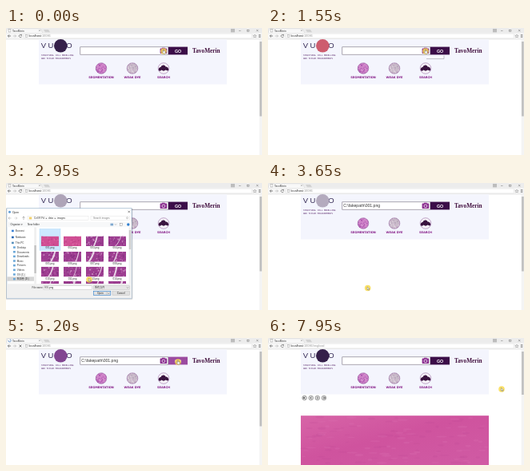
An HTML page that plays this animation: 320 px wide and 159 px high, repeating every 8000 ms.

```html
<!DOCTYPE html>
<html lang="en">
<head>
<meta charset="utf-8">
<title>TavoMerin</title>
<style>
html, body { margin: 0; width: 100%; height: 100%; overflow: hidden; background: #fff; }
svg { display: block; width: 100%; height: 100%; }
text { font-family: "Liberation Sans", "Noto Sans CJK SC", "Noto Sans CJK", sans-serif; white-space: pre; }
.label { font: bold 3.6px "DejaVu Sans", sans-serif; fill: #861d88; text-anchor: middle; }
.mono { font: 2.69px "DejaVu Sans Mono", monospace; fill: #5b2a6c; }
.word { font: bold 7.3px "Liberation Serif", serif; fill: #42103f; }
.mark { font-size: 9.5px; fill: #352a55; text-anchor: middle; }
</style>
</head>
<body>
<svg id="stage" viewBox="0 0 320 159" preserveAspectRatio="none"></svg>
<script>
const NS = 'http://www.w3.org/2000/svg';
const LOOP = 8000;
const stage = document.getElementById('stage');

function add(parent, tag, attrs = {}, content) {
  const el = document.createElementNS(NS, tag);
  for (const k in attrs) el.setAttribute(k, attrs[k]);
  if (content !== undefined) el.textContent = content;
  parent.appendChild(el);
  return el;
}
const group = (p, attrs) => add(p, 'g', attrs);
const rect = (p, x, y, width, height, fill, more) => add(p, 'rect', { x, y, width, height, fill, ...more });
const circle = (p, cx, cy, r, fill, more) => add(p, 'circle', { cx, cy, r, fill, ...more });
const line = (p, d, stroke, w = 0.6, more) => add(p, 'path', { d, stroke, 'stroke-width': w, fill: 'none', ...more });
const text = (p, x, y, s, size = 3, fill = '#444', more) => add(p, 'text', { x, y, 'font-size': size, fill, ...more }, s);
const styled = (p, x, y, s, cls) => add(p, 'text', { x, y, class: cls }, s);
const show = (el, on) => el.setAttribute('display', on ? 'inline' : 'none');
const move = (el, x, y) => el.setAttribute('transform', `translate(${x.toFixed(2)} ${y.toFixed(2)})`);
const border = (stroke, w = 0.5) => ({ stroke, 'stroke-width': w });

function random(seed) {
  return () => (seed = (seed * 16807) % 2147483647) / 2147483647;
}

// Clips shared by the thumbnails and round icons
const defs = add(stage, 'defs');
function clip(id, tag, attrs) {
  add(add(defs, 'clipPath', { id }), tag, attrs);
}
clip('thumb', 'rect', { width: 22, height: 12.5 });
clip('thumbCut', 'rect', { width: 22, height: 3.5 });
clip('disc', 'circle', { r: 7 });
const tissue = add(defs, 'linearGradient', { id: 'tissue', x1: 0, y1: 0, x2: 1, y2: 1 });
[['0', '#d764a7'], ['.45', '#cf539e'], ['1', '#d05ba4']].forEach(([offset, c]) =>
  add(tissue, 'stop', { offset, 'stop-color': c }));

// Browser window
rect(stage, 0, 0, 320, 159, '#fff');
rect(stage, 0, 0, 320, 7, '#ececec');
add(stage, 'path', { d: 'M0 6.5L2 .8H43L46 6.5Z', fill: '#f8f8f8', stroke: '#c4c4c4', 'stroke-width': 0.4 });
add(stage, 'path', { d: 'M47 2H53L55 5.3H49Z', fill: '#d2d2d2' });
rect(stage, 0, 6.3, 320, 7.6, '#f6f6f6');
line(stage, 'M0 14H320', '#d2d2d2', 0.5);
const tabPage = rect(stage, 3.3, 1.6, 2.6, 3.4, '#fff', border('#888', 0.4));
const tabSpin = line(stage, 'M1.6 0A1.6 1.6 0 1 1 0 -1.6', '#4a7fc0', 0.7);
text(stage, 8, 4.7, 'TavoMerin', 3.2, '#333');
line(stage, 'M41 2.2l2 2m0-2l-2 2', '#777', 0.4);
rect(stage, 281, 1, 5, 4.4, '#bcbcbc');
line(stage, 'M291 3.5h2.6', '#555', 0.4);
rect(stage, 301.5, 2.2, 2.4, 2.4, 'none', border('#555', 0.4));
line(stage, 'M313 2l2.4 2.4m0-2.4l-2.4 2.4', '#555', 0.4);
line(stage, 'M6 10H2.4M4 8.4L2.4 10L4 11.6', '#555', 0.7);
line(stage, 'M9 10h3.6M11 8.4L12.6 10L11 11.6', '#bbb', 0.7);
const reload = line(stage, 'M19.6 10.6A1.7 1.7 0 1 1 19.2 8.8M19.6 7.8V9.2H18.2', '#555', 0.6);
const stop = line(stage, 'M16.6 8.6l2.8 2.8m0-2.8l-2.8 2.8', '#555', 0.7);
rect(stage, 22.5, 7.2, 285, 5.6, '#fff', { rx: 0.6, ...border('#d4d4d4', 0.4) });
rect(stage, 24.3, 8.2, 2.5, 3.4, '#fff', border('#888', 0.4));
const url = add(stage, 'text', { x: 28.5, y: 11.4, 'font-size': 3.9, fill: '#222' });
add(url, 'tspan', {}, 'localhost');
const urlPath = add(url, 'tspan', { fill: '#999' });
add(stage, 'path', { d: 'M311 8l.6 1.4 1.5.1-1.2 1 .4 1.5-1.3-.8-1.3.8.4-1.5-1.2-1 1.5-.1z', fill: 'none', stroke: '#777', 'stroke-width': 0.4 });
line(stage, 'M315.8 8.6h2.6m-2.6 1.4h2.6m-2.6 1.4h2.6', '#555', 0.6);
rect(stage, 316.6, 14.2, 3.4, 145, '#f4f4f4');
const scrollThumb = rect(stage, 317, 17, 2.8, 93.5, '#c1c1c1');

// Page header
rect(stage, 41, 14.2, 235, 56.3, '#f4f5fd');
styled(stage, 46.8, 25.4, 'V', 'mark');
styled(stage, 56, 25.4, 'U', 'mark');
styled(stage, 79, 25.4, 'O', 'mark');
const logo = circle(stage, 68.3, 22.3, 8.3, '#35204a');
styled(stage, 44, 35.3, 'STRUCTURAL CELL MODELLING', 'mono');
styled(stage, 44, 38.8, 'AND TISSUE MEASUREMENTS', 'mono');
rect(stage, 92.8, 23.8, 110, 9.4, '#fff', border('#77707c', 0.6));
const query = text(stage, 94.2, 30.2, 'C:\\fakepath\\001.png', 5.1, '#333');
rect(stage, 192.6, 25.6, 8.6, 6.4, '#8b2f90', { rx: 0.8 });
rect(stage, 195, 24.7, 3.6, 1.6, '#8b2f90');
circle(stage, 196.9, 28.9, 1.9, '#8b2f90', border('#fff', 0.7));
const go = rect(stage, 203, 23.6, 24, 9.8, '#3b0d48');
text(stage, 215, 30.5, 'GO', 5.3, '#fff', { 'text-anchor': 'middle', 'font-weight': 'bold' });
styled(stage, 233, 31, 'TavoMerin', 'word');

// Round menu icons
function menuIcon(x, name, base, spots, seed) {
  const g = group(stage, { transform: `translate(${x} 50.5)` });
  const inner = group(g, { 'clip-path': 'url(#disc)' });
  circle(inner, 0, 0, 7, base);
  const rnd = random(seed);
  for (let i = 0; i < 60 && spots; i++)
    circle(inner, rnd() * 14 - 7, rnd() * 14 - 7, 0.4 + rnd() * 0.5, spots[i % spots.length], { opacity: 0.7 });
  circle(g, 0, 0, 6.8, 'none', border('#8d5a98', 0.5));
  styled(stage, x, 63, name, 'label');
  return inner;
}
menuIcon(119, 'SEGMENTATION', '#cf83c8', ['#a646a8', '#e3b0e0', '#8f3a9c'], 71);
menuIcon(158, 'WEAK DYE', '#cbbccb', ['#a697ad', '#e7dde6', '#b58fb6'], 133);
const search = menuIcon(197, 'SEARCH', '#f5f1f7');
add(search, 'path', { d: 'M-6.5 2.5C-6.5-.5-5-1.5-3.5-1.5C-3-4.5 1.5-5 2.5-2C5-2.5 6.5 0 6.5 2.5C5 3.5 3.5 2.5 2.5 2C1 3.5-1 3.5-2.5 2C-4 3.5-5.5 3.5-6.5 2.5Z', fill: '#39133f' });

// Tooltip of the file field
const tip = group(stage);
rect(tip, 198, 34.6, 22, 4, '#f8f8fd');
line(tip, 'M198 38.6H220V34.6', '#8a8590', 0.5);

// Result page: pager buttons and picture
const pager = group(stage);
const glyphs = ['M.8-1.2L-.6 0L.8 1.2M-1.2-1.2V1.2', 'M.6-1.2L-.8 0L.6 1.2', 'M-.6-1.2L.8 0L-.6 1.2', 'M-.8-1.2L.6 0L-.8 1.2M1.2-1.2V1.2'];
const buttons = glyphs.map(d => {
  const g = group(pager);
  circle(g, 0, 0, 2.8, '#dedede', border('#858585', 0.7));
  line(g, d, '#444', 0.8);
  return g;
});
const result = group(stage);
rect(result, 41, 97.2, 235, 62, 'url(#tissue)');
const grain = random(417);
for (let i = 0; i < 130; i++)
  add(result, 'ellipse', { cx: 44 + grain() * 229, cy: 99 + grain() * 58, rx: 2 + grain() * 5, ry: 0.5 + grain(), fill: i % 2 ? '#bd4794' : '#dd75b4', opacity: 0.22 });

// File dialog
const dialog = group(stage);
for (let i = 3; i > 0; i--)
  rect(dialog, 1 - i / 2, 32.2 - i / 3, 156 + i, 112 + i, '#000', { opacity: 0.09, rx: i / 2 });
rect(dialog, 1, 31.8, 156, 112.7, '#fff', border('#8fb4d6', 0.5));
circle(dialog, 4.5, 36.3, 1.5, '#5b9bd5');
text(dialog, 8, 37.6, 'Open', 3.3, '#222');
line(dialog, 'M152.5 34.8l2.4 2.4m0-2.4l-2.4 2.4', '#333', 0.5);
line(dialog, 'M6.5 44H3M4.6 42.4L3 44L4.6 45.6', '#999', 0.5);
line(dialog, 'M10.5 44H14M12.4 42.4L14 44L12.4 45.6', '#bbb', 0.5);
line(dialog, 'M22 46V42M20.5 43.5L22 42L23.5 43.5', '#777', 0.5);
rect(dialog, 27, 41.3, 76, 5.4, '#fff', border('#dcdcdc', 0.4));
rect(dialog, 28.8, 42.6, 3.5, 2.8, '#f1cf6a');
text(dialog, 35, 45.2, 'Cell R Pd  ▸  data  ▸  images', 3.1, '#333');
rect(dialog, 106, 41.3, 48.5, 5.4, '#fff', border('#dcdcdc', 0.4));
text(dialog, 109, 45.2, 'Search images', 3.1, '#777');
circle(dialog, 151.5, 43.7, 1, 'none', border('#777', 0.4));
rect(dialog, 1.4, 48.6, 155.2, 6.6, '#f7f8f9');
text(dialog, 5.5, 53, 'Organize ▾', 3.1, '#333');
text(dialog, 27, 53, 'New folder', 3.1, '#333');
rect(dialog, 130.5, 50.6, 3.6, 2.8, '#7fa9cf');
line(dialog, 'M136 51.4l1 1l1-1', '#555', 0.4);
rect(dialog, 142.5, 50.6, 3.2, 2.8, '#fff', border('#777', 0.4));
circle(dialog, 152.8, 52, 1.7, '#2f7fd0');

const places = ['Boxnest', 'Nimbusto', 'This PC', 'Desktop', 'Documents', 'Downloads', 'Music', 'Pictures', 'Videos', 'OS (C:)', '新加卷 (D:)'];
rect(dialog, 1.4, 117.4, 33.6, 5.3, '#d5d5d5');
places.forEach((name, i) => {
  const x = i < 3 ? 7 : 9, y = i < 2 ? 60 + i * 8 : 75 + (i - 2) * 5.65;
  rect(dialog, x, y - 1.3, 2.8, 2.5, ['#3c82d5', '#2b69b4', '#5790bc', '#6aa7d8'][Math.min(i, 3)]);
  text(dialog, x + 4.8, y + 1.2, name, 3, '#333');
});
rect(dialog, 35.2, 55.6, 2.8, 70.6, '#f0f0f0');
rect(dialog, 35.4, 78, 2.4, 35, '#c4c4c4');
const picked = rect(dialog, 42, 57.5, 26, 27, '#cce8ff', border('#a5d4f6', 0.4));

function thumb(n, col, row) {
  const y = [66.6, 86, 104.8, 122.8][row];
  const pink = row === 0 && col < 2;
  const g = group(dialog, { transform: `translate(${44 + col * 28} ${y})` });
  const pic = group(g, { 'clip-path': `url(#${row < 3 ? 'thumb' : 'thumbCut'})` });
  const rnd = random(900 + n * 77);
  const spots = pink ? ['#bd3f85', '#de68a5'] : ['#b655a4', '#7d2b79', '#d9a6d0'];
  rect(pic, 0, 0, 22, 13, pink ? '#d04f94' : '#9c3d90');
  for (let i = 0; i < 36; i++)
    circle(pic, rnd() * 22, rnd() * 13, 0.4 + rnd() * 0.7, spots[i % spots.length], { opacity: 0.7 });
  if (!pink) {
    const a = 9 + rnd() * 11;
    line(pic, `M${a} -1Q${a - 1} 6 ${a - 9 + rnd() * 5} 14`, '#f1e4f0', 0.8 + rnd() * 1.8, { opacity: 0.9 });
  }
  if (row < 3) text(g, 11, 15.9, String(n).padStart(3, '0') + '.png', 3, '#333', { 'text-anchor': 'middle' });
}
[1, 2, 3, 4, 5, 6, 7, 8, 10, 11, 13, 14, 15, 16, 17, 18].forEach((n, i) => thumb(n, i % 4, i >> 2));
rect(dialog, 153.6, 55.6, 2.8, 70.6, '#f0f0f0');
rect(dialog, 153.8, 59, 2.4, 24, '#cdcdcd');
rect(dialog, 1.4, 126.3, 155.2, 17.8, '#f0f0f0');
text(dialog, 32.5, 132.3, 'File name:', 3, '#333');
rect(dialog, 47, 128.8, 60.5, 4.6, '#fff', border('#b5b5b5', 0.4));
const fileName = text(dialog, 48, 132.2, '001.png', 3.1, '#222');
rect(dialog, 109.3, 128.8, 45, 4.6, '#e6e6e6', border('#b5b5b5', 0.4));
text(dialog, 111, 132.3, '所有文件', 3.1, '#333');
line(dialog, 'M151 130.5l1 1l1-1', '#555', 0.5);
rect(dialog, 109.3, 135.6, 21.5, 5, '#e1e1e1', border('#2b7fd0', 0.6));
text(dialog, 114, 139.3, 'Open', 3.2, '#222');
line(dialog, 'M126 135.8v4.6', '#aaa', 0.4);
line(dialog, 'M127.2 137.6l1 1l1-1', '#444', 0.5);
rect(dialog, 133, 135.6, 21.5, 5, '#e1e1e1', border('#b5b5b5', 0.4));
text(dialog, 143.7, 139.3, 'Cancel', 3.2, '#222', { 'text-anchor': 'middle' });

// Pointer with its yellow halo
const pointer = group(stage);
circle(pointer, 0, 0, 3.8, '#f8d949', { opacity: 0.82 });
const arrow = add(pointer, 'path', { d: 'M-.6-1.6V2.2L.4 1.3L1.1 2.9L1.8 2.6L1.1 1H2.3Z', fill: '#fff', stroke: '#444', 'stroke-width': 0.35 });
const hand = add(pointer, 'path', { d: 'M-.5-2V.8L-1.4 0L-1.9.6L-.2 3H1.9L2.3.3L.4-.2V-2Z', fill: '#fff', stroke: '#444', 'stroke-width': 0.35 });

// Keyframes: [time, value...]
const route = [
  [0, 197, 29], [1700, 197, 29], [2300, 56, 75], [2500, 56, 75], [2950, 104, 121],
  [3250, 118, 138], [3550, 118, 138], [4150, 206, 52], [4350, 206, 51],
  [4850, 215, 30], [6100, 215, 30], [6600, 220, 42], [7300, 220, 42], [7850, 292, 64], [8000, 292, 64]
];
const tints = [
  [0, 53, 32, 74], [700, 53, 32, 74], [1100, 205, 92, 110], [1900, 205, 92, 110],
  [2500, 172, 162, 182], [4400, 184, 176, 194], [4900, 130, 70, 145], [5700, 130, 70, 145],
  [6300, 158, 163, 188], [7200, 158, 163, 188], [7700, 58, 38, 78], [8000, 53, 32, 74]
];
function sample(keys, t) {
  let i = 1;
  while (i < keys.length - 1 && keys[i][0] < t) i++;
  const a = keys[i - 1], b = keys[i];
  const u = Math.min(1, Math.max(0, (t - a[0]) / (b[0] - a[0])));
  const k = u * u * (3 - 2 * u);
  return a.slice(1).map((v, j) => v + (b[j + 1] - v) * k);
}
const within = (t, from, to) => t >= from && t < to;

function draw(t) {
  const loading = within(t, 5150, 7300);
  const loaded = t >= 5700;
  const overGo = within(t, 4800, 6200);
  const overField = t < 1700;

  logo.setAttribute('fill', `rgb(${sample(tints, t).map(Math.round)})`);
  show(tip, within(t, 900, 1650));
  show(dialog, within(t, 1650, 3550));
  show(picked, t >= 2400);
  show(fileName, t >= 2400);
  show(query, within(t, 3550, 5700));
  go.setAttribute('fill', overGo ? '#9b4ba0' : '#3b0d48');

  show(stop, loading);
  show(reload, !loading);
  show(tabSpin, loading);
  show(tabPage, !loading);
  tabSpin.setAttribute('transform', `translate(4.6 3.3) rotate(${(t * 0.4) % 360})`);
  const path = loaded ? ':10086/imgload' : ':10086';
  if (urlPath.textContent !== path) urlPath.textContent = path;
  scrollThumb.setAttribute('height', loaded ? 54 : 93.5);

  show(pager, t >= 5850);
  buttons.forEach((b, i) => {
    const u = ((t - 6850) / 225 + 3.5 - i + 80) % 4;
    const dip = loading && u < 1 ? 4 * Math.sin(Math.PI * u) : 0;
    move(b, 45.6 + i * 8.1, 75 + dip);
  });
  show(result, t >= 7300);

  move(pointer, ...sample(route, t));
  show(hand, overGo || overField);
  show(arrow, !overGo && !overField);
}

const start = performance.now();
function tick() {
  draw((performance.now() - start) % LOOP);
  requestAnimationFrame(tick);
}
draw(0);
requestAnimationFrame(tick);
</script>
</body>
</html>
```
